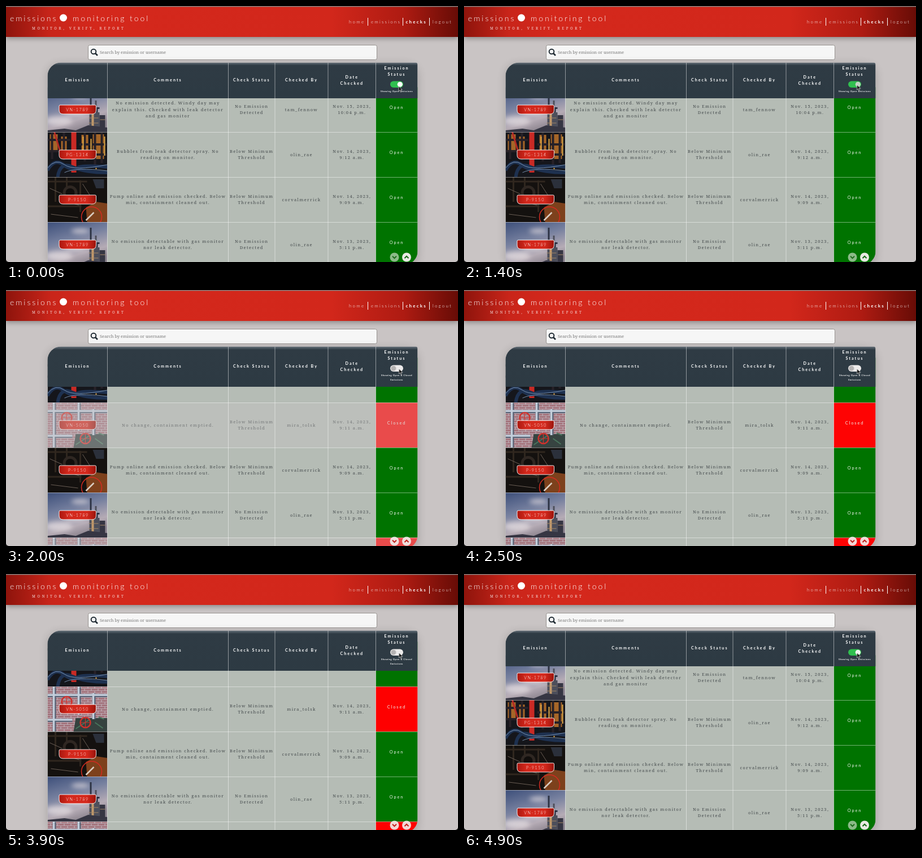
Write an HTML page that moves like this. It is 800x455 px and loops after 5 s.

```html
<!DOCTYPE html>
<html lang="en">
<head>
<meta charset="utf-8">
<title>Emission checks</title>
<style>
html, body { margin: 0; width: 100%; height: 100%; overflow: hidden; background: #c9c4c4; }
svg { display: block; }
#stage { width: 800px; height: 455px; }
text { font-family: Lato, sans-serif; fill: #fff; }
.mid { text-anchor: middle; }
.title { font-size: 14px; font-weight: 300; letter-spacing: 2.9px; }
.motto { font: 6.2px "Noto Serif", serif; letter-spacing: 3.65px; fill-opacity: .85; }
.nav { font-size: 8px; font-weight: 300; letter-spacing: 2.2px; }
.nav.on { font-weight: 700; }
.find { font: 7.55px "Noto Serif", serif; fill: #777; }
.th { font-size: 7.2px; font-weight: 700; letter-spacing: 2px; }
.tiny { font-size: 4px; font-weight: 700; letter-spacing: .57px; }
.td { font: 7.5px "Noto Serif", serif; letter-spacing: 1.38px; fill: #444a4c; }
.status { font-size: 7.3px; letter-spacing: 1.95px; fill: #f0f4ee; }
.tag { font-size: 7.2px; font-weight: 300; letter-spacing: 1.6px; }
</style>
</head>
<body>
<svg id="stage" viewBox="0 0 800 455">
  <defs>
    <linearGradient id="bar">
      <stop offset="0" stop-color="#8e140c"/><stop offset=".1" stop-color="#c9251a"/>
      <stop offset=".2" stop-color="#d4281c"/><stop offset=".72" stop-color="#d2271b"/>
      <stop offset=".88" stop-color="#ae1b12"/><stop offset="1" stop-color="#670c06"/>
    </linearGradient>
    <linearGradient id="label">
      <stop offset="0" stop-color="#a9170f"/><stop offset=".25" stop-color="#d4281c"/>
      <stop offset=".75" stop-color="#d4281c"/><stop offset="1" stop-color="#9a140c"/>
    </linearGradient>
    <linearGradient id="head" x2="0" y2="1">
      <stop offset="0" stop-color="#66717a"/><stop offset=".08" stop-color="#2f3b44"/>
      <stop offset="1" stop-color="#2d3a43"/>
    </linearGradient>
    <linearGradient id="dusk" x2=".4" y2="1">
      <stop offset="0" stop-color="#3d4f7a"/><stop offset=".45" stop-color="#76809f"/>
      <stop offset=".8" stop-color="#b5abb5"/><stop offset="1" stop-color="#8f8791"/>
    </linearGradient>
    <pattern id="brick" width="12" height="8" patternUnits="userSpaceOnUse">
      <rect width="12" height="8" fill="#c3b9c1"/>
      <path d="M0 0h11v3.200H0zM0 4h5v3.200H0zM6 4h6v3.200H6z" fill="#a3737c"/>
    </pattern>
    <filter id="soft" x="-20%" y="-20%" width="140%" height="140%"><feGaussianBlur stdDeviation="8"/></filter>
    <filter id="haze" x="-30%" y="-30%" width="160%" height="160%"><feGaussianBlur stdDeviation="4"/></filter>
    <clipPath id="frame"><path d="M73.500 124.500a24 24 0 0 1 24-24h627a4 4 0 0 1 4 4V436a24 24 0 0 1-24 24h-631z"/></clipPath>

    <symbol id="tower" viewBox="0 0 106 80">
      <rect width="106" height="80" fill="url(#dusk)"/>
      <g fill="#e6dfe2" opacity=".75" filter="url(#haze)">
        <ellipse cx="50" cy="45" rx="20" ry="6"/><ellipse cx="20" cy="60" rx="24" ry="8"/><ellipse cx="58" cy="16" rx="16" ry="4"/>
      </g>
      <path d="M75 10h3v26h-3zM68 36h24v3H68zM72 39h17v6H72z" fill="#2d3344"/>
      <path d="M84 24h3v14h-3zM74 45h18v35H74z" fill="#4d4f5b"/>
      <path d="M78 47h4v28h-4z" fill="#c29a6c"/>
      <path d="M92 50h10v30H92zM0 77l30-3 20 3 22-9 34 4v8H0z" fill="#363643"/>
      <path d="M73 55h17M73 64h17M93 58h9" stroke="#a88966" fill="none"/>
    </symbol>
    <symbol id="pipes" viewBox="0 0 106 80">
      <rect width="106" height="80" fill="#15161b"/>
      <path d="M4 4h14v30H4zM24 8h10v24H24zM60 5h12v42H60zM80 4h20v44H80z" fill="#a66628"/>
      <path d="M8 0v48M29 0v50M66 0v52M84 0v58M96 0v55M0 14h40M56 22h50M0 34h40M58 40h48" stroke="#272127" stroke-width="4"/>
      <path d="M63 8v30M77 12v34M101 8v34M86 58v8" stroke="#e0a845" stroke-width="2"/>
      <path d="M42 0h9v72h-9z" fill="#c92a25"/><path d="M12 0l12 40" stroke="#b32a25" stroke-width="3"/>
      <path d="M0 68q12-22 28-10t24 6 54-2M18 80q4-28 26-18t62 10" stroke="#1e3150" stroke-width="6" fill="none"/>
      <path d="M0 64q14-18 30-6t76 0M30 72q20-10 76-3" stroke="#8daacb" stroke-width=".8" fill="none"/>
    </symbol>
    <symbol id="engine" viewBox="0 0 106 80">
      <rect width="106" height="80" fill="#14110f"/>
      <path d="M0 8h70M14 0v44M34 0v30M0 52h60M58 6v56" stroke="#30271f" stroke-width="3"/>
      <path d="M80 4h20v16H86z" fill="#2b303b"/>
      <circle cx="40" cy="28" r="13" fill="#2f2722"/><circle cx="40" cy="28" r="8" fill="#110e0c"/>
      <path d="M68 54l18-10 20 3v33H70z" fill="#7d411c"/>
      <path d="M4 20l22 10M6 66l48 6M20 40l36 10M62 12l14 22" stroke="#6a5e55"/>
      <circle cx="78" cy="71" r="18" fill="none" stroke="#d52a20" stroke-width="1.500"/>
      <path d="M68 77l14-14" stroke="#d9cdc2" stroke-width="2.500"/>
    </symbol>
    <symbol id="valves" viewBox="0 0 106 80">
      <rect width="106" height="80" fill="url(#brick)"/>
      <path d="M50 56h56v24H46z" fill="#35423f"/>
      <path d="M12 0v80M0 16h106M56 0v50M82 12v46M0 60h44" stroke="#566174" stroke-width="6" fill="none"/>
      <path d="M11 0v80M0 15h106M55 0v50M81 12v46M0 59h44" stroke="#c3cedb" stroke-width="3.500" fill="none"/>
      <path d="M50 75l24-16M84 64l14 10M90 54l10 4" stroke="#47745b" stroke-width="2"/>
      <g fill="none" stroke="#cf302b" stroke-width="2.500">
        <circle cx="34" cy="27" r="9"/><circle cx="67" cy="64" r="9"/>
        <path d="M25 27h18M34 18v18M58 64h18M67 55v18" stroke-width="1.200"/>
      </g>
    </symbol>
  </defs>

  <rect width="800" height="455" fill="#c9c4c4"/>
  <rect y="4" width="800" height="54" fill="#000" opacity=".3" filter="url(#haze)"/>
  <rect y="1" width="800" height="54" fill="url(#bar)"/>
  <rect width="800" height="1.500" fill="#85817f"/>
  <text class="title" x="7" y="27">emissions</text>
  <circle cx="101.500" cy="21" r="6.500" fill="#fff"/>
  <text class="title" x="118" y="27">monitoring tool</text>
  <text class="motto" x="46" y="41.500">MONITOR, VERIFY, REPORT</text>
  <text class="nav" x="607" y="30.500">home</text>
  <text class="nav" x="646" y="30.500">emissions</text>
  <text class="nav on" x="707.500" y="30.500">checks</text>
  <text class="nav" x="755" y="30.500">logout</text>
  <path d="M640.500 21v14M702.500 21v14M749.500 21v14" stroke="#fff"/>

  <rect x="145.500" y="69.500" width="511" height="26" rx="3" fill="#f6f6f6" stroke="#96928f"/>
  <g fill="none" stroke="#232e36" stroke-width="2">
    <circle cx="155" cy="81" r="4.300"/><path d="M158 84l4 4" stroke-width="2.600"/>
  </g>
  <text class="find" x="166" y="85.300">Search by emission or username</text>

  <rect x="74" y="104" width="655" height="360" rx="20" fill="#000" opacity=".18" filter="url(#soft)"/>
  <g clip-path="url(#frame)">
    <rect x="73" y="100" width="656" height="360" fill="#c9c4c4"/>
    <g id="table"></g>
  </g>
  <rect id="track" x="680" y="133.500" width="23" height="11.500" rx="5.750" fill="#30bf4f"/>
  <circle id="knob" cx="697.300" cy="139.250" r="4.600" fill="#fff"/>
  <path id="arrow" d="M0 0v9l2.100-1.900 1.500 3.300 1.500-.7-1.500-3.200h2.700z" fill="#111" stroke="#fff" stroke-width=".6"/>
  <path d="M0 450v5h5a5 5 0 0 1-5-5zM800 450v5h-5a5 5 0 0 0 5-5z" fill="#111"/>
</svg>
<script>
const LOOP = 5000, SHOW = 1640, HIDE = 4400;
const edges = [73.5, 179.5, 393.5, 476, 570, 654.5, 728.5];
const mid = i => (edges[i] + edges[i + 1]) / 2;
const $ = id => document.getElementById(id);

const lines = (cls, x, y, str, gap = 11.6) => str.split('|').map((s, i, all) =>
  `<text class="mid ${cls}" x="${x}" y="${y + 2.6 + (i - (all.length - 1) / 2) * gap}">${s}</text>`).join('');

const checks = {
  windy: ['tower', 'VN-1789', 'No emission detected. Windy day may|explain this. Checked with leak detector|and gas monitor',
    'No Emission|Detected', 'tam_fennow', 'Nov. 15, 2023,|10:04 p.m.'],
  spray: ['pipes', 'PG-1314', 'Bubbles from leak detector spray. No|reading on monitor.',
    'Below Minimum|Threshold', 'olin_rae', 'Nov. 14, 2023,|9:12 a.m.'],
  empty: ['valves', 'VN-5050', 'No change, containment emptied.',
    'Below Minimum|Threshold', 'mira_tolsk', 'Nov. 14, 2023,|9:11 a.m.', true],
  pump: ['engine', 'P-9150', 'Pump online and emission checked. Below|min, containment cleaned out.',
    'Below Minimum|Threshold', 'corvalmerrick', 'Nov. 14, 2023,|9:09 a.m.'],
  clear: ['tower', 'VN-1789', 'No emission detectable with gas monitor|nor leak detector.',
    'No Emission|Detected', 'olin_rae', 'Nov. 13, 2023,|5:11 p.m.']
};

function row([photo, tag, note, result, user, date, closed], top) {
  const c = top + 40;
  return `<g class="${closed ? 'closed' : 'open'}">
    <rect x="73.5" y="${top}" width="581.5" height="80" fill="#b5bcb5"/>
    <rect x="654.5" y="${top}" width="74" height="80" fill="${closed ? '#fe0000' : '#007300'}"/>
    <use href="#${photo}" x="73.5" y="${top}" width="106" height="80"/>
    <path d="M96 ${c - 8}h61.500q2 0 2 2v7q0 7-7 7h-51.500q-7 0-7-7v-7q0-2 2-2z" fill="url(#label)" stroke="#fff" stroke-width=".9"/>
    ${lines('tag', mid(0), c, tag)}
    ${[note, result, user, date].map((s, i) => lines('td', mid(i + 1), c, s)).join('')}
    ${lines('status', mid(5), c - 4, closed ? 'Closed' : 'Open')}</g>`;
}

const button = (x, dir, ink, alpha) => `<circle cx="${x}" cy="446.5" r="8" fill="#f2efed" opacity="${alpha}"/>
  <path d="M${x - 3.5} ${446.5 - dir * 1.7}l3.500 ${dir * 3.5}l3.500 ${-dir * 3.5}" fill="none" stroke="${ink}" stroke-width="2"/>`;

function view(id, names, top, base, caption, buttons) {
  const y = (101 + base) / 2 - .8;
  const heads = ['Emission', 'Comments', 'Check Status', 'Checked By', 'Date|Checked'];
  const rules = names.map((_, i) => `M73.5 ${top + 80 * i + .5}H728.5`).join('');
  const cols = edges.slice(1, -1).map(x => `M${x} 101V455`).join('');
  return `<g id="${id}">${names.map((n, i) => row(checks[n], top + 80 * i)).join('')}
    <path d="${rules}" stroke="#fff" stroke-opacity=".45"/>
    <rect x="73.5" y="100.5" width="655" height="${base - 100.5}" fill="url(#head)"/>
    <path d="${cols}" stroke="#fff" stroke-opacity=".48"/>
    ${heads.map((h, i) => lines('th', mid(i), y, h)).join('')}
    ${lines('th', mid(5), 116, 'Emission|Status')}
    ${caption.split('|').map((s, i) => lines('tiny', mid(5), 150.5 + 8.3 * i, s)).join('')}
    ${buttons}</g>`;
}

$('table').innerHTML =
  view('openOnly', ['windy', 'spray', 'pump', 'clear'], 144, 164, 'Showing Open Emissions',
    button(687.5, 1, '#1f6b1d', .58) + button(709, -1, '#176b16', .96)) +
  view('everything', ['spray', 'empty', 'pump', 'clear', 'empty'], 120, 172, 'Showing Open &amp; Closed|Emissions',
    button(687.5, 1, '#c3211d', .9) + button(709, -1, '#c3211d', .9));

// steps: [ms, value, easing to the next step]
function play(el, prop, steps) {
  el.animate(steps.map(([ms, value, easing = 'linear']) => ({ offset: ms / LOOP, [prop]: value, easing })),
    { duration: LOOP, iterations: Infinity });
}
const hold = 'step-end';
const swap = (el, a, b) => play(el, 'visibility', [[0, a, hold], [SHOW, b, hold], [HIDE, a, hold], [LOOP, a]]);

swap($('openOnly'), 'visible', 'hidden');
swap($('everything'), 'hidden', 'visible');
document.querySelectorAll('#everything .closed').forEach(el =>
  play(el, 'opacity', [[0, 0, hold], [SHOW, 0, 'ease'], [SHOW + 1000, 1], [LOOP, 1]]));

play($('track'), 'fill', [[0, '#30bf4f'], [1500, '#30bf4f', 'ease'], [1700, '#eceaea'],
  [4300, '#eceaea', 'ease'], [4500, '#30bf4f'], [LOOP, '#30bf4f']]);
play($('knob'), 'fill', [[0, '#ffffff'], [1200, '#ffffff'], [1400, '#c3d2c4'], [1700, '#b4b2b2'],
  [4300, '#b4b2b2'], [4500, '#f0f5f0'], [LOOP, '#f0f5f0']]);
play($('knob'), 'transform', [[0, 'translate(0px, 0px)'], [1500, 'translate(0px, 0px)', 'ease'],
  [1700, 'translate(-11.500px, 0px)'], [4300, 'translate(-11.500px, 0px)', 'ease'],
  [4500, 'translate(0px, 0px)'], [LOOP, 'translate(0px, 0px)']]);
play($('arrow'), 'transform', [[0, 'translate(695px, 142.500px)', hold], [100, 'translate(695.500px, 140px)'],
  [LOOP, 'translate(695.500px, 140px)']]);
</script>
</body>
</html>
```
